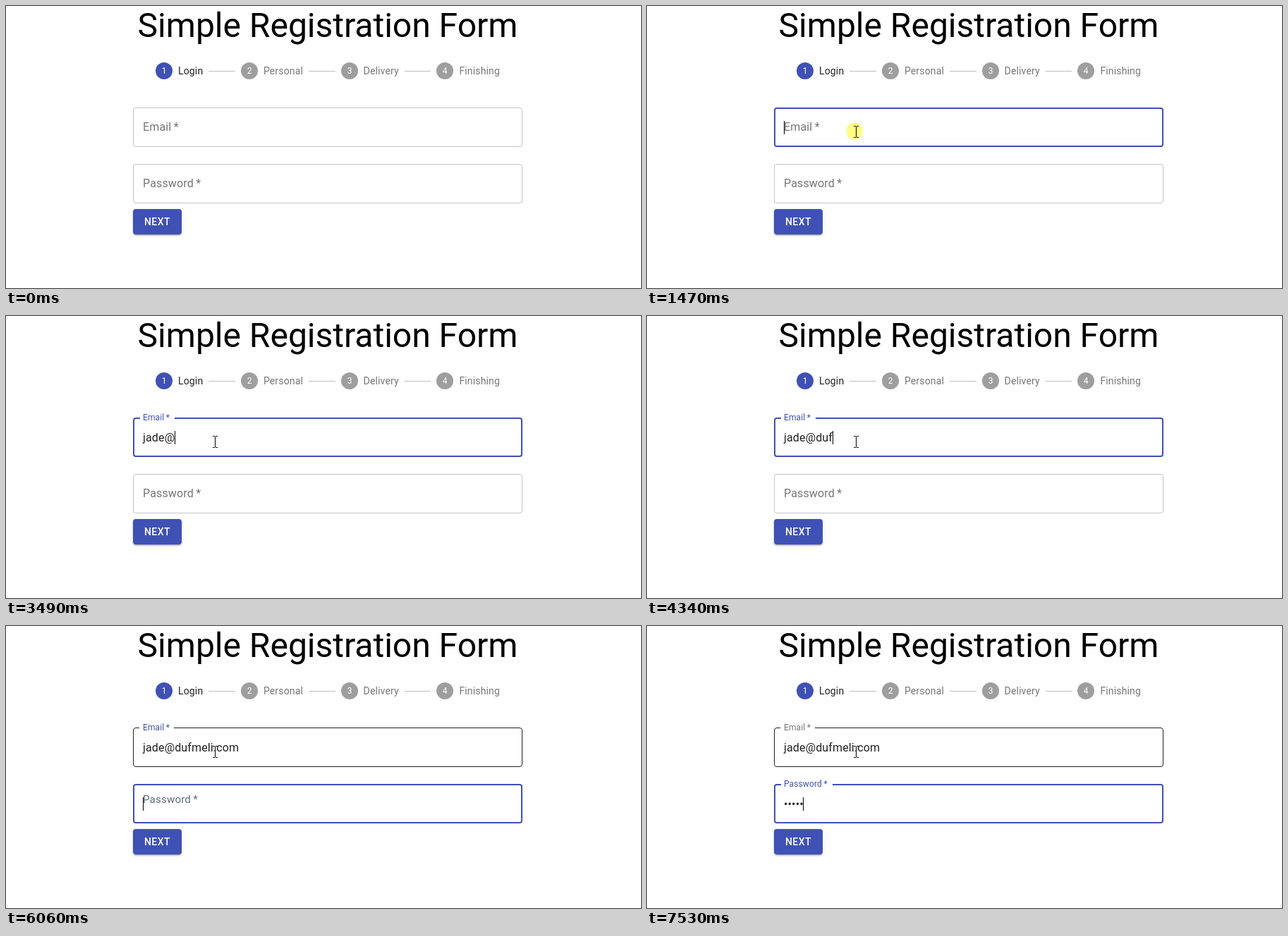
An HTML page for the animation above (7990 ms loop, 900 by 400 pixels).

```html
<!DOCTYPE html>
<html lang="en">
<head>
<meta charset="utf-8">
<title>Simple Registration Form</title>
<style>
  html, body { margin: 0; width: 100%; height: 100%; overflow: hidden; background: #fff; }
  body { position: relative; font: 16px Roboto, sans-serif; letter-spacing: .00938em; }
  main { position: absolute; left: 180px; top: 0; width: 552px; }
  h1 { margin: 0; font-size: 48px; font-weight: 400; line-height: 56px; letter-spacing: 0;
       text-align: center; white-space: nowrap; color: #000; }
  .stepper { display: flex; align-items: center; height: 24px; padding: 24px; }
  .step { display: flex; align-items: center; padding: 0 8px; font-size: 14px; line-height: 20px;
          letter-spacing: .01071em; color: rgba(0,0,0,.54); }
  .step svg { width: 24px; height: 24px; margin-right: 8px; fill: #9e9e9e; }
  .step text { font-size: 12px; letter-spacing: 0; text-anchor: middle; fill: #fff; }
  .step.on { color: rgba(0,0,0,.87); }
  .step.on svg { fill: #3f51b5; }
  .line { flex: 1; border-top: 1px solid #bdbdbd; }
  .field { position: absolute; left: 0; width: 552px; height: 56px; }
  .box { position: absolute; inset: 0; box-sizing: border-box; border-radius: 4px; }
  .notch { position: absolute; top: 0; height: 2px; background: #fff; }
  .label { position: absolute; left: 0; top: 0; line-height: 1; white-space: nowrap;
           transform-origin: 0 0; }
  .value { position: absolute; left: 14px; top: 18.5px; height: 19px; line-height: 19px;
           display: flex; white-space: pre; color: rgba(0,0,0,.87); }
  .caret { width: 1px; height: 19px; margin-left: -.5px; background: #000; }
  .button { position: absolute; left: 0; top: 288px; padding: 6px 16px; border-radius: 4px;
            font-size: 14px; font-weight: 500; line-height: 24px; letter-spacing: .02857em;
            color: #fff; background: #3f51b5;
            box-shadow: 0 3px 1px -2px rgba(0,0,0,.2), 0 2px 2px rgba(0,0,0,.14), 0 1px 5px rgba(0,0,0,.12); }
  #pointer { position: absolute; left: 0; top: 0; width: 900px; height: 400px; }
</style>
</head>
<body>
<main>
  <h1>Simple Registration Form</h1>
  <div class="stepper"></div>
</main>
<svg id="pointer">
  <circle id="click" cx="294" cy="177.5" r="12" fill="#ff0" fill-opacity=".47"/>
  <path id="arrow" d="M.5 .5v16l3.7-3.5 2.6 5.8 2.2-1-2.5-5.6h5.2z" fill="#fff" stroke="#000"/>
  <path id="beam" d="M-3-7.5h3m1 0h3M.5-7v15M-3 8.5h3m1 0h3" fill="none" stroke="#000" shape-rendering="crispEdges"/>
</svg>
<script>
const LOOP = 7990, FOCUS = 1470, TAB = 6047, SHIFT = 200;
const EMAIL = 'jade@dufmeli.com';
const emailKeys = [2560, 2860, 3020, 3100, 3490, 4030, 4190, 4340, 4500, 4580, 4730, 4970, 5200, 5360, 5510, 5750];
const passKeys = [6450, 6610, 6760, 7150, 7530];
const main = document.querySelector('main');
const get = id => document.getElementById(id);
const show = (el, on) => { el.style.visibility = on ? 'visible' : 'hidden'; };

document.querySelector('.stepper').innerHTML = ['Login', 'Personal', 'Delivery', 'Finishing']
  .map((name, i) => `<div class="step${i ? '' : ' on'}"><svg><circle cx="12" cy="12" r="12"/>` +
    `<text x="12" y="16">${i + 1}</text></svg>${name}</div>`)
  .join('<div class="line"></div>');

function makeField(name, top, notchWidth) {
  const el = document.createElement('div');
  el.className = 'field';
  el.style.top = top + 'px';
  el.innerHTML = `<div class="box"></div><div class="notch" style="width:${notchWidth}px"></div>` +
    `<div class="label">${name}&thinsp;*</div>` +
    '<div class="value"><span></span><div class="caret"></div></div>';
  main.append(el);
  const [box, notch, label, value] = el.children;
  return { box, notch, label, text: value.firstChild, caret: value.lastChild };
}
const email = makeField('Email', 144, 49);
const pass = makeField('Password', 224, 73);
main.insertAdjacentHTML('beforeend', '<div class="button">NEXT</div>');

// cubic-bezier(0, 0, .2, 1)
function easeOut(x) {
  if (x <= 0) return 0;
  if (x >= 1) return 1;
  let lo = 0, hi = 1;
  for (let i = 0; i < 20; i++) {
    const s = (lo + hi) / 2;
    if (.6 * s * s + .4 * s ** 3 < x) lo = s; else hi = s;
  }
  return lo * lo * (3 - 2 * lo);
}

// The screen refreshes in coarse steps while something moves.
const hold = (t, start, step) => start + Math.floor((t - start) / step) * step;
const typed = (keys, t) => keys.filter(k => k <= t).length;

function drawField(f, { focused, hover, lift, tint, open, text, caret }) {
  f.box.style.border = focused ? '2px solid #3f51b5'
    : `1px solid rgba(0,0,0,${hover ? .87 : .23})`;
  f.notch.style.left = focused ? '10px' : '9px';
  show(f.notch, open);
  f.label.style.transform = `translate(14px,${20 - 26 * lift}px) scale(${1 - .25 * lift})`;
  f.label.style.color = `rgba(${63 * tint},${81 * tint},${181 * tint},${.54 + .46 * tint})`;
  f.text.textContent = text;
  show(f.caret, caret);
}

function drawPointer(t) {
  const k = Math.min(1, Math.max(0, (hold(t, 760, 80) - 760) / 560));
  const e = k * k * (3 - 2 * k);
  const x = Math.round(9 + 287 * e), y = Math.round(134 + 44 * e);
  const inside = x >= 180 && y >= 144;
  for (const id of ['arrow', 'beam']) get(id).setAttribute('transform', `translate(${x} ${y})`);
  show(get('arrow'), t >= 760 && !inside);
  show(get('beam'), inside);
  show(get('click'), t >= FOCUS && t < 1550);
  return inside;
}

function draw(t) {
  const hover = drawPointer(t);
  const tabbed = t >= 6060;
  const t1 = hold(t, FOCUS, 77), t2 = hold(t, 6060, 80);
  const lift1 = easeOut((t1 - FOCUS) / SHIFT);
  const lift2 = tabbed ? easeOut((t2 - TAB) / SHIFT) : 0;
  drawField(email, {
    focused: t >= FOCUS && !tabbed, hover,
    lift: lift1, tint: lift1 - lift2, open: t1 >= FOCUS + 52,
    text: EMAIL.slice(0, typed(emailKeys, t)),
    caret: t >= FOCUS && !tabbed && !(t >= 2010 && t < 2560)
  });
  drawField(pass, {
    focused: tabbed, hover: false,
    lift: lift2, tint: lift2, open: tabbed && t2 >= TAB + 52,
    text: '•'.repeat(typed(passKeys, t)), caret: tabbed
  });
}

const begin = performance.now();
function tick() {
  draw((performance.now() - begin) % LOOP);
  requestAnimationFrame(tick);
}
tick();
</script>
</body>
</html>
```
